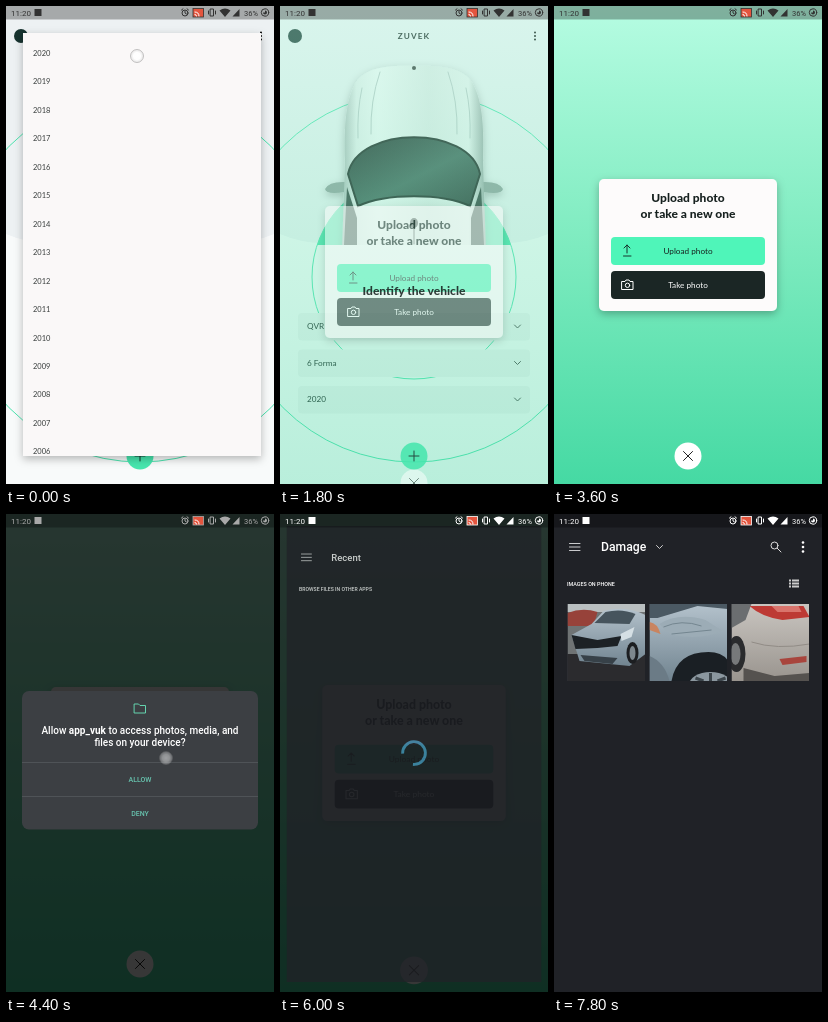
An HTML page for the animation above (8000 ms loop, 268 px wide and 480 px high).

```html
<!DOCTYPE html>
<html lang="en">
<head>
<meta charset="utf-8">
<title>Vehicle photo upload</title>
<style>
  html, body { margin: 0; width: 100%; height: 100%; overflow: hidden; background: #000; }
  svg { display: block; width: 100%; height: 100%; }
  text { font-family: Lato, sans-serif; font-size: 8.2px; fill: #17211f; }
  .mid { text-anchor: middle; }
  .head { font-size: 12px; font-weight: 800; }
  .sys text { font-family: Roboto, sans-serif; font-weight: 500; fill: #fff; }
  .sys { fill: #fff; }
  .sys .action { font-size: 7px; fill: #68c5b0; }
  .sys .question { font-size: 10px; }
  .sys .label { font-size: 5.4px; }
  .sys .title { font-size: 12.2px; }
  .sys .subtitle { font-size: 10px; }
  .line { fill: none; stroke: currentColor; stroke-width: 1; stroke-linecap: round; stroke-linejoin: round; }
  #photos > g { filter: blur(.5px); }
</style>
</head>
<body>
<svg viewBox="0 0 268 480" preserveAspectRatio="none">
  <defs>
    <linearGradient id="mint" x2="0" y2="1">
      <stop stop-color="#b6fce2"/><stop offset=".5" stop-color="#7debbf"/><stop offset="1" stop-color="#45d9a3"/>
    </linearGradient>
    <linearGradient id="paint">
      <stop stop-color="#a9b1b1"/><stop offset=".1" stop-color="#e9eded"/><stop offset=".25" stop-color="#f6f8f8"/>
      <stop offset=".6" stop-color="#e4e9e8"/><stop offset=".88" stop-color="#eef1f1"/><stop offset="1" stop-color="#929c9b"/>
    </linearGradient>
    <linearGradient id="glass" x2="1" y2="1">
      <stop stop-color="#18211f"/><stop offset=".55" stop-color="#3b5c52"/><stop offset="1" stop-color="#222e2b"/>
    </linearGradient>
    <linearGradient id="silver" x2="0" y2="1">
      <stop stop-color="#b4c2cc"/><stop offset="1" stop-color="#718490"/>
    </linearGradient>
    <linearGradient id="beige" x2="0" y2="1">
      <stop stop-color="#c9c5c0"/><stop offset="1" stop-color="#99948e"/>
    </linearGradient>
    <radialGradient id="tip">
      <stop stop-color="#fff"/><stop offset=".55" stop-color="#fff" stop-opacity=".85"/><stop offset="1" stop-color="#ddd" stop-opacity=".55"/>
    </radialGradient>
    <filter id="soft" x="-20%" y="-20%" width="140%" height="140%">
      <feDropShadow dx="0" dy="3" stdDeviation="4" flood-opacity=".28"/>
    </filter>
    <clipPath id="tile"><rect width="77.5" height="77"/></clipPath>
    <clipPath id="listArea"><rect x="17" y="27" width="238" height="423"/></clipPath>
    <clipPath id="carArea"><rect width="268" height="239"/></clipPath>
  </defs>

  <g id="scene">
    <g id="page">
      <rect width="268" height="480" fill="#f8fafa"/>
      <path d="M0 0H268V228Q240 240 210 236H58Q28 240 0 228Z" fill="#edf1f3"/>
      <g fill="none" stroke="#4be3ae">
        <circle cx="134" cy="271" r="185"/><circle cx="134" cy="271" r="102"/>
      </g>
      <g clip-path="url(#carArea)">
        <circle cx="134" cy="271" r="102" fill="#45e3aa"/>
        <g filter="url(#soft)">
          <path d="M66 176Q49 175 45 183Q46 189 65 186ZM202 176Q219 175 223 183Q222 189 203 186Z" fill="#8f9a98"/>
          <path d="M134 60C106 59 82 62 74 80C65 98 64 125 65 155L62 245H206L203 155C204 125 203 98 194 80C186 62 162 59 134 60Z" fill="url(#paint)"/>
        </g>
        <path class="line" color="#bcc6c6" d="M82 82Q77 105 78 132M186 82Q191 105 190 132M100 66Q90 95 91 128M168 66Q178 95 177 128"/>
        <path d="M68 168C78 119 190 119 200 168L190 200C162 187 106 187 78 200Z" fill="url(#glass)" stroke="#151b19" stroke-width="2"/>
        <path d="M67 181L77 212V239H64ZM201 181L191 212V239H204Z" fill="#2c3835"/>
        <path d="M134 220V238" class="line" color="#333"/>
        <ellipse cx="134" cy="217" rx="4" ry="5" fill="#222827"/>
        <circle cx="134" cy="62" r="2" fill="#333"/>
      </g>
      <circle cx="15" cy="30" r="7" fill="#17332f"/>
      <text x="134" y="33" class="mid" font-weight="700" letter-spacing="1.1">ZUVEK</text>
      <g><circle cx="255" cy="26.5" r="1"/><circle cx="255" cy="30" r="1"/><circle cx="255" cy="33.5" r="1"/></g>
      <g id="fields"></g>
    </g>

    <rect id="wash" width="268" height="480" fill="url(#mint)"/>
    <g id="popup">
      <rect x="45" y="173" width="178" height="132" rx="5" fill="#fdfbfb" filter="url(#soft)"/>
      <text x="134" y="196" class="mid head">Upload photo</text>
      <text x="134" y="212" class="mid head">or take a new one</text>
      <rect x="57" y="231" width="154" height="28" rx="4" fill="#4ff5b9"/>
      <rect x="57" y="265" width="154" height="28" rx="4" fill="#1b2625"/>
      <text x="134" y="247.5" class="mid">Upload photo</text>
      <text x="134" y="282" class="mid" style="fill:#fff">Take photo</text>
      <path class="line" color="#17352c" d="M73 247V239M70 242L73 239L76 242M69.500 250H77"/>
      <g class="line" color="#fff"><path d="M68 275.500H71L72 274H75L76 275.500H79V283.500H68Z"/><circle cx="73.500" cy="279.300" r="2.200"/></g>
      <circle cx="134" cy="450" r="13.500" fill="#fff"/>
      <path class="line" color="#222" d="M129.500 445.500L138.500 454.500M138.500 445.500L129.500 454.500"/>
    </g>
    <g id="front">
      <text x="134" y="289" class="mid head">Identify the vehicle</text>
      <circle cx="134" cy="450" r="13.500" fill="#47e6ae"/>
      <path class="line" color="#10352a" d="M129 450H139M134 445V455"/>
    </g>
  </g>

  <g id="list">
    <rect x="17" y="27" width="238" height="423" fill="#faf8f8" filter="url(#soft)"/>
    <g id="years" clip-path="url(#listArea)"></g>
  </g>

  <rect id="dim" width="268" height="480"/>

  <g id="dialog" class="sys">
    <rect x="16" y="177" width="236" height="138.500" rx="7" fill="#3c3f43"/>
    <path class="line" color="#64d3ae" d="M128.500 190H132.500L134 191.500H139.500V199H128.500Z"/>
    <text x="134" y="219.500" class="mid question">Allow <tspan font-weight="700">app_vuk</tspan> to access photos, media, and</text>
    <text x="134" y="231.500" class="mid question">files on your device?</text>
    <path d="M16 248.500H252M16 282.500H252" stroke="#55595c" stroke-width=".8"/>
    <text x="134" y="268" class="mid action">ALLOW</text>
    <text x="134" y="301.500" class="mid action">DENY</text>
  </g>

  <g id="picker" class="sys">
    <rect width="268" height="480" fill="#202227"/>
    <path class="line" color="#c9cacc" d="M15.500 29.500H26M15.500 33H26M15.500 36.500H26"/>
    <g id="recent">
      <text x="47" y="36.500" class="subtitle">Recent</text>
      <text x="13" y="68.500" class="label">BROWSE FILES IN OTHER APPS</text>
      <circle id="spinner" cx="134" cy="239" r="12" fill="none" stroke="#4a9cc4" stroke-width="3" stroke-dasharray="58 18"/>
    </g>
    <g id="damage">
      <text x="47" y="37" class="title">Damage</text>
      <path class="line" color="#ccc" d="M102.500 31.500L105.500 34.500L108.500 31.500"/>
      <g class="line" color="#ddd"><circle cx="220.500" cy="31.500" r="3.500"/><path d="M223.200 34.200L227 38"/></g>
      <circle cx="249" cy="28.500" r="1.300"/><circle cx="249" cy="33" r="1.300"/><circle cx="249" cy="37.500" r="1.300"/>
      <text x="13" y="72" class="label">IMAGES ON PHONE</text>
      <path d="M235 66.500H237M238 66.500H245M235 69.500H237M238 69.500H245M235 72.500H237M238 72.500H245" stroke="#ccc" stroke-width="2.200"/>
      <g id="photos">
        <g transform="translate(13.500 90)" clip-path="url(#tile)">
          <rect width="78" height="77" fill="#6f7374"/><rect width="78" height="8" fill="#b9bfc0"/>
          <rect y="50" width="78" height="27" fill="#2b2b2e"/>
          <path d="M0 9Q15 3 30 8L26 22H0Z" fill="#97423a"/>
          <path d="M4 31L24 20L36 7Q58 1 78 11V50L62 62L12 57Z" fill="url(#silver)"/>
          <path d="M27 19L38 8Q54 4 68 10L62 20Z" fill="#46545d"/>
          <path d="M4 31L30 36L54 32L50 42L30 44L8 45Z" fill="#1c2125"/>
          <path d="M53 30L67 23L64 33L54 37Z" fill="#d5dfe4"/>
          <ellipse cx="65" cy="49" rx="6" ry="11" fill="#1c1e21"/><ellipse cx="65" cy="49" rx="3" ry="7" fill="#7d878d"/>
          <path d="M13 51L50 54L45 60L17 57Z" fill="#374148"/>
        </g>
        <g transform="translate(95.500 90)" clip-path="url(#tile)">
          <rect width="78" height="77" fill="url(#silver)"/>
          <path d="M0 0H78V5L48 2L8 14L0 14Z" fill="#4b5963"/>
          <path d="M0 18Q8 19 11 30L0 26Z" fill="#c98460"/>
          <path d="M10 20Q29 8 56 16L73 27Q48 37 20 30Z" fill="#9cacb6"/>
          <path d="M14 23Q32 15 52 22M22 30L62 26" fill="none" stroke="#748690"/>
          <path d="M0 52Q15 58 20 77H0Z" fill="#6b7b86"/>
          <path d="M22 77Q27 48 59 48Q72 48 78 56V77Z" fill="#1a1f24"/>
          <ellipse cx="61" cy="82" rx="22" ry="14" fill="#8b979f"/>
          <path d="M61 69V77M46 74L54 77M76 74L68 77" stroke="#3c454b" stroke-width="3"/>
        </g>
        <g transform="translate(177.500 90)" clip-path="url(#tile)">
          <rect width="78" height="77" fill="url(#beige)"/>
          <path d="M0 0H20L14 16L0 24Z" fill="#6b6e70"/>
          <path d="M18 2H72L78 13L51 16Q30 13 18 2Z" fill="#bd3a34"/>
          <path d="M40 2H67L70 8H46Z" fill="#d9746c"/>
          <path d="M20 38Q45 46 78 40" fill="none" stroke="#918c86"/>
          <path d="M48 55L75 52V58L51 61Z" fill="#a8453d"/>
          <ellipse cx="5" cy="50" rx="9" ry="18" fill="#2a2b2d"/><ellipse cx="4" cy="50" rx="5" ry="11" fill="#77797a"/>
          <path d="M12 64L43 72L78 69V77H12Z" fill="#55524f"/>
        </g>
      </g>
    </g>
  </g>

  <rect width="268" height="13.500" opacity=".3"/>
  <g id="status">
    <text x="5" y="9.500" style="font:8px Roboto,sans-serif;fill:currentColor">11:20</text>
    <rect x="28.500" y="3" width="7" height="7" fill="currentColor"/>
    <g class="line"><circle cx="179" cy="7" r="3"/><path d="M179 5V7L180.500 8M175.500 4L177 2.800M182.500 4L181 2.800"/></g>
    <rect x="187" y="2.500" width="10.500" height="8.500" fill="#e4553e" stroke="currentColor" stroke-width=".8"/>
    <path class="line" color="#fff" d="M189 6Q193 6 193 10M189 8.500Q190.500 8.500 190.500 10"/>
    <path class="line" d="M204.500 3H207.500V10H204.500ZM202.500 5V8M209.500 5V8"/>
    <path d="M213.500 4.500Q219 .5 224.500 4.500L219 11ZM226.500 10.500H233.500V3Z" fill="currentColor"/>
    <text x="238" y="9.500" style="font:7.500px Roboto,sans-serif;fill:currentColor">36%</text>
    <circle class="line" cx="259" cy="6.500" r="3.700"/><path d="M259 4.500A2 2 0 1 1 257 6.500H259Z" fill="currentColor"/>
  </g>
  <rect y="478" width="268" height="2"/>
  <circle id="touch" r="6.500" fill="url(#tip)" stroke="#8b8b8b" stroke-opacity=".6" stroke-width=".8"/>
</svg>

<script>
const LOOP = 8000, TICK = 200;
const el = Object.fromEntries([...document.querySelectorAll('[id]')].map(n => [n.id, n]));
const ramp = (t, start, end) => Math.min(1, Math.max(0, (t - start) / (end - start)));
const fade = (node, value) => { node.style.opacity = value; };
const zoom = (node, s) => node.setAttribute('transform', `translate(134 240) scale(${s}) translate(-134 -240)`);

const touches = [
  { from: 0, to: 200, x: 131, y: 50 },
  { from: 1400, to: 1600, x: 134, y: 450 },
  { from: 3800, to: 4600, x: 160, y: 244 },
  { from: 5400, to: 5800, x: 143, y: 271 }
];

el.years.innerHTML = Array.from({ length: 15 }, (_, i) =>
  `<text x="27" y="${50 + i * 28.45}" style="font-size:7.5px;fill:#3a3f3e">${2020 - i}</text>`).join('');

el.fields.innerHTML = ['QVR', '6 Forma', '2020'].map((name, i) => {
  const y = 307 + i * 36.5;
  return `<rect x="18" y="${y}" width="232" height="27.5" rx="4" fill="#eef1f1"/>
    <text x="27" y="${y + 16}">${name}</text>
    <path class="line" color="#444" d="M234.500 ${y + 12}l3 3 3-3"/>`;
}).join('');

function draw(t) {
  const shown = ramp(t, 1600, 2000);
  const opened = ramp(t, 5700, 6100);
  const dark = 0.94 * ramp(t, 4000, 4480);

  fade(el.list, 1 - ramp(t, 0, 400));
  fade(el.wash, shown ** 1.5);
  fade(el.popup, shown);
  el.popup.setAttribute('transform', `translate(0 ${54 * (1 - shown)})`);
  fade(el.front, 1 - shown ** 3);
  zoom(el.scene, 1 + 0.04 * opened);

  fade(el.dim, dark - 0.21 * opened);
  fade(el.dialog, ramp(t, 3900, 4300) * (1 - ramp(t, 5700, 5900)));

  fade(el.picker, opened);
  zoom(el.picker, 0.8 + 0.2 * opened);
  const inFolder = t >= 7200;
  fade(el.recent, inFolder ? 0 : 1);
  fade(el.damage, inFolder ? 1 : 0);
  fade(el.photos, ramp(t, 7200, 7600));
  el.spinner.setAttribute('transform', `rotate(${(t - 6000) * 0.4 - 183} 134 239)`);

  const tone = Math.round(50 + 205 * (dark / 0.94) ** 3);
  el.status.style.color = `rgb(${tone},${tone},${tone})`;

  const touch = touches.find(p => t >= p.from && t < p.to);
  fade(el.touch, touch ? 1 - 0.5 * ramp(t, 3800, 4400) * (t < 5000) : 0);
  if (touch) el.touch.setAttribute('transform', `translate(${touch.x} ${touch.y})`);
}

function loop() {
  draw(Math.floor(performance.now() % LOOP / TICK) * TICK);
  requestAnimationFrame(loop);
}
loop();
</script>
</body>
</html>
```
